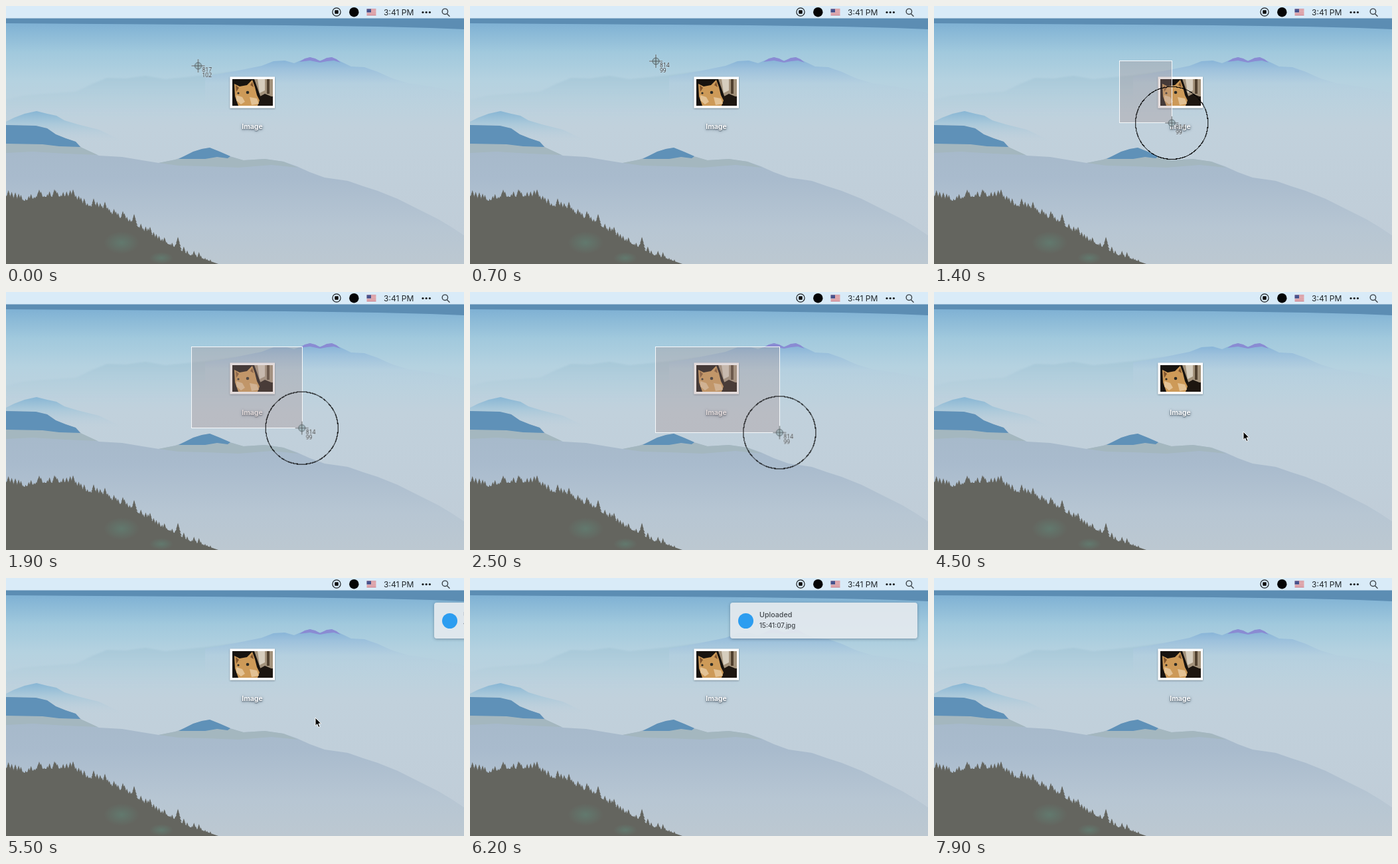
Write an HTML page that moves like this. It is 690 by 388 pixels and loops after 8 s.

```html
<!DOCTYPE html>
<html lang="en">
<head>
<meta charset="utf-8">
<title>Screen capture upload</title>
<style>
@property --x { syntax: '<number>'; inherits: true; initial-value: 289.5; }
@property --y { syntax: '<number>'; inherits: true; initial-value: 90; }
@property --readX { syntax: '<integer>'; inherits: true; initial-value: 817; }
@property --readY { syntax: '<integer>'; inherits: true; initial-value: 102; }

html, body { margin: 0; width: 100%; height: 100%; overflow: hidden; }
body { font-family: Inter, Roboto, sans-serif; }
#stage {
  position: relative; width: 690px; height: 388px; overflow: hidden;
  animation: drag 8s infinite;
}
#stage > * { position: absolute; }
#scene { left: 0; top: 0; }

/* Selection and pointer */
#selection {
  left: 279px; top: 82px; box-sizing: border-box;
  width: calc((var(--x) - 278) * 1px); height: calc((var(--y) - 82 + .5) * 1px);
  background: rgba(168, 142, 144, .32); border: 1.5px solid #f6f8fa;
  animation: selecting 8s step-end infinite;
}
#pointer {
  left: 0; top: 0; width: 0; height: 0;
  transform: translate(calc(var(--x) * 1px), calc(var(--y) * 1px));
  animation: aiming 8s step-end infinite;
}
#pointer svg { position: absolute; left: -60px; top: -60px; }
#ring { animation: pressing 8s step-end infinite; }
.reading {
  position: absolute; left: 6px; font: 8.5px/8px 'Open Sans', sans-serif; color: #23282c;
  text-shadow: 0 0 1px #fff, 0 0 2px rgba(255, 255, 255, .7);
}
.rx { top: 2px; counter-reset: n var(--readX); }
.ry { top: 10px; counter-reset: n var(--readY); }
.reading::after { content: counter(n); }
#arrow { left: 463px; top: 208px; animation: idle 8s step-end infinite; }

/* Notification */
#note {
  left: 392px; top: 37px; width: 282px; height: 54px; border-radius: 4px;
  background: rgba(226, 232, 238, .95); box-shadow: 0 1px 4px rgba(40, 60, 80, .42);
  color: #42474c; white-space: nowrap; animation: slide 8s infinite;
}
#note > * { position: absolute; }
#note i { left: 11.5px; top: 15.5px; width: 23px; height: 23px; border-radius: 50%; background: #2c9df0; }
#note b { left: 44px; top: 12px; font: 500 10.7px/14px Inter, sans-serif; }
#note span { left: 44px; top: 28px; font: 500 9.8px/13px Inter, sans-serif; }

@keyframes drag {
  0% { --x: 289.5; --y: 90; --readX: 817; --readY: 102; animation-timing-function: ease-in-out; }
  7.5%, 11% { --x: 280; --y: 83; --readX: 814; --readY: 99; animation-timing-function: ease-in; }
  17.5% { --x: 358; --y: 175.8; animation-timing-function: ease-out; }
  27.5%, 100% { --x: 466.4; --y: 211.4; --readX: 814; --readY: 99; }
}
@keyframes selecting { 0% { opacity: 0; } 11% { opacity: 1; } 34%, 100% { opacity: 0; } }
@keyframes pressing { 0% { opacity: 0; } 10% { opacity: 1; } 34%, 100% { opacity: 0; } }
@keyframes aiming { 0% { opacity: 1; } 35%, 100% { opacity: 0; } }
@keyframes idle { 0% { opacity: 0; } 35% { opacity: 1; } 72.5%, 100% { opacity: 0; } }
@keyframes slide {
  0%, 67.5% { transform: translateX(303px); animation-timing-function: cubic-bezier(.33, 0, .3, 1); }
  73.75%, 90% { transform: none; animation-timing-function: ease-in; }
  96.25%, 100% { transform: translateX(303px); }
}
</style>
</head>
<body>
<div id="stage">
  <svg id="scene" width="690" height="388" viewBox="0 0 690 388">
    <defs>
      <linearGradient id="sky" x2="0" y2="388" gradientUnits="userSpaceOnUse">
        <stop offset=".07" stop-color="#80b2d4"/>
        <stop offset=".18" stop-color="#a1c9dd"/>
        <stop offset=".29" stop-color="#b5d2e0"/>
        <stop offset=".47" stop-color="#c1d1dc"/>
        <stop offset="1" stop-color="#c0ccd7"/>
      </linearGradient>
      <linearGradient id="far" x1="0" x2="0" y1="76" y2="150" gradientUnits="userSpaceOnUse">
        <stop offset="0" stop-color="#7fafd6"/>
        <stop offset=".25" stop-color="#9dc1dc"/>
        <stop offset=".55" stop-color="#b4cfdf" stop-opacity=".85"/>
        <stop offset="1" stop-color="#bdd0dd" stop-opacity="0"/>
      </linearGradient>
      <linearGradient id="haze" x1="0" x2="0" y1="105" y2="165" gradientUnits="userSpaceOnUse">
        <stop offset="0" stop-color="#a3c5d6"/>
        <stop offset="1" stop-color="#b5cfdc" stop-opacity="0"/>
      </linearGradient>
      <linearGradient id="peak" x1="0" x2="0" y1="157" y2="205" gradientUnits="userSpaceOnUse">
        <stop offset="0" stop-color="#86b5d4"/>
        <stop offset=".4" stop-color="#a9c8da"/>
        <stop offset="1" stop-color="#bfd0dc" stop-opacity="0"/>
      </linearGradient>
      <linearGradient id="near" x1="0" x2="0" y1="205" y2="388" gradientUnits="userSpaceOnUse">
        <stop offset="0" stop-color="#a6b9ca"/>
        <stop offset=".3" stop-color="#a9bbcd"/>
        <stop offset=".7" stop-color="#b7c6d3"/>
        <stop offset="1" stop-color="#bcc8d1"/>
      </linearGradient>
      <radialGradient id="moss">
        <stop offset="0" stop-color="#5f9180" stop-opacity=".45"/>
        <stop offset="1" stop-color="#5f9180" stop-opacity="0"/>
      </radialGradient>
      <filter id="soft"><feGaussianBlur stdDeviation="1"/></filter>
      <filter id="blur"><feGaussianBlur stdDeviation=".6"/></filter>
      <filter id="shade" x="-20%" y="-20%" width="140%" height="160%">
        <feDropShadow dx="0" dy="1" stdDeviation="1.3" flood-color="#30404c" flood-opacity=".55"/>
      </filter>
      <clipPath id="crop"><path d="M341 110h61v40h-61z"/></clipPath>
    </defs>

    <path fill="url(#sky)" d="M0 0h690v388H0z"/>
    <path fill="#5c8db3" d="M0 18H690V35L640 33 560 31 420 29 300 28 140 27 0 26z"/>

    <!-- Distant ridges -->
    <path fill="url(#haze)" opacity=".7" filter="url(#soft)" d="M0 141 25 135 60 132 105 129 130 117 152 108 180 109 210 105 240 110 300 104 345 98 400 110V190H0z"/>
    <path fill="url(#far)" d="M300 106 345 98 385 90 403 83 420 82 434 86 446 81 458 77 473 82 490 77 503 83 520 91 540 92 560 99 580 108 605 116 640 121 690 131V190H300z"/>
    <path fill="#8a8bd3" d="M442 84 450 79 458 77 466 79 473 83 483 78 491 77 498 80 504 85 494 82 484 83 473 85 458 82z"/>
    <path fill="url(#peak)" d="M0 174 12 168 28 162 46 158 62 162 76 165 88 172 108 178 140 186 170 200V230H0z"/>

    <!-- Near ridges -->
    <path fill="url(#near)" d="M0 179 45 180 62 184 75 193 90 199 105 204 114 213 140 225 175 227 205 232 230 236 255 231 268 226 282 219 295 215 307 213 322 219 338 226 357 232 390 230 418 234 438 241 458 250 480 258 515 263 538 271 560 278 590 290 612 301 632 311 652 321 672 333 690 345V388H0z"/>
    <path fill="#a4b7bf" filter="url(#blur)" d="M0 206 55 207 112 212 138 224 90 222 40 219 0 221z"/>
    <path fill="#a4b7bf" filter="url(#blur)" d="M230 236 270 228 340 227 358 232 390 230 418 234 440 243 400 239 350 243 300 241 260 240z"/>
    <path fill="#5f91b8" d="M0 179 45 180 62 184 75 193 90 199 105 204 112 212 80 211 55 208 0 207z"/>
    <path fill="#5f91b8" d="M260 230 268 226 282 219 295 215 307 213 322 219 338 226 334 229 318 227 300 230z"/>

    <path id="forest" fill="#64655f"/>
    <ellipse cx="174" cy="356" rx="27" ry="17" fill="url(#moss)"/>
    <ellipse cx="234" cy="379" rx="18" ry="9" fill="url(#moss)"/>

    <!-- Menu bar -->
    <path fill="#d9ebf8" d="M0 0h690v18.5H0z"/>
    <circle cx="498" cy="9" r="6.1" fill="none" stroke="#1c2023" stroke-width="1.2"/>
    <rect x="495.2" y="6.2" width="5.6" height="5.6" rx="1" fill="#111"/>
    <circle cx="524.3" cy="9.2" r="7.2" fill="#050505"/>
    <path fill="#f3eef0" d="M543.5 4.5h14v9.5h-14z"/>
    <path stroke="#c4525d" stroke-width="1" d="M543.5 5h14m-14 2.2h14m-14 2.2h14m-14 2.2h14m-14 2h14"/>
    <path fill="#46548f" d="M543.5 4.5h6.5v5.2h-6.5z"/>
    <text x="569" y="13.5" font-size="12.1" fill="#22282c">3:41 PM</text>
    <g fill="#14181b"><circle cx="628" cy="9.5" r="1.6"/><circle cx="633.2" cy="9.5" r="1.6"/><circle cx="638.4" cy="9.5" r="1.6"/></g>
    <path fill="none" stroke="#3d4449" stroke-width="1.4" d="M664.5 11.8 668.5 15.8M665.6 8.3a4.2 4.2 0 1 1-8.4 0a4.2 4.2 0 1 1 8.4 0"/>

    <!-- Desktop file -->
    <path fill="#fff" filter="url(#shade)" d="M337.5 106.5h67.5v47h-67.5z"/>
    <g clip-path="url(#crop)">
      <path fill="#17130f" d="M341 110h61v40h-61z"/>
      <g filter="url(#blur)">
        <path fill="#a3927b" d="M374 110h28v26l-18 2z"/>
        <path fill="#d6cdbd" d="M379 110h11v17l-8 4z"/>
        <path fill="#51412f" d="M393 110h4v22h-4z"/>
        <path fill="#1d1610" d="M379 138 390 132 402 137V150H376z"/>
        <path fill="#cd9a58" d="M344 117 352 121 363 119 371 111 375 122 378 134 382 142 379 150H350L345 136z"/>
        <path fill="#80542d" d="M346 119 351 123 347 129zM368 119 371 114 373 122z"/>
        <path fill="#e3c294" d="M347 134 356 137 360 144 354 148 347 142zM367 137 378 139 381 147 370 149z"/>
        <circle cx="350" cy="131" r="1.6" fill="#2c2b25"/>
        <circle cx="364" cy="130" r="2.3" fill="#2c2b25"/>
      </g>
    </g>
    <text x="371" y="184.5" text-anchor="middle" font-size="10.5" font-weight="700" fill="#fff"
      style="text-shadow:0 1px 2px rgba(40,55,70,.8),0 1px 4px rgba(40,55,70,.5)">Image</text>
  </svg>

  <div id="selection"></div>

  <div id="pointer">
    <svg width="120" height="120" viewBox="-60 -60 120 120" fill="none">
      <circle id="ring" r="54.5" stroke="#000" stroke-width="1.2" shape-rendering="crispEdges"/>
      <path stroke="#fff" stroke-opacity=".4" stroke-width="2.6" d="M-10 0H10M0-10V10"/>
      <circle r="5" fill="#8ba9ad" fill-opacity=".5" stroke="#59656a" stroke-width="1"/>
      <path stroke="#4b555a" stroke-width="1.1" d="M-10 0H10M0-10V10"/>
    </svg>
    <div class="reading rx"></div>
    <div class="reading ry"></div>
  </div>

  <svg id="arrow" width="16" height="20" viewBox="-3 -2 16 20">
    <path fill="#050505" stroke="#fff" stroke-width="1" d="M0 0V12.4L2.8 9.8 4.8 14.6 7 13.7 5 9H8.8z"/>
  </svg>

  <div id="note"><i></i><b>Uploaded</b><span>15:41:07.jpg</span></div>
</div>

<script>
// Treetops along a falling slope, from a seeded generator.
let seed = 41;
const random = () => (seed = seed * 16807 % 2147483647) / 2147483647;

const slope = [[0, 286], [28, 293], [50, 287], [100, 286], [118, 299], [140, 304], [168, 317],
  [192, 327], [215, 344], [255, 363], [275, 374], [300, 381], [320, 388]];

function ground(x) {
  const i = Math.max(1, slope.findIndex(p => p[0] >= x));
  const [x0, y0] = slope[i - 1], [x1, y1] = slope[i];
  return y0 + (y1 - y0) * (x - x0) / (x1 - x0);
}

function tree(x, height) {
  const top = ground(x) + 6 - height, width = height * .25 + 1.5;
  const left = [], right = [];
  for (let k = 1; k <= 5; k++) {
    const y = top + height * k / 5, w = width * k / 5;
    right.push(`${x + w} ${y}`, `${x + w * .6} ${y - .8}`);
    left.unshift(`${x - w * .6} ${y - .8}`, `${x - w} ${y}`);
  }
  return `M${x} ${top}L${right.join(' ')} ${left.join(' ')}z`;
}

let d = 'M0 388L' + slope.map(p => p.join(' ')).join(' ') + 'z';
for (let x = 0; x < 312; x += 2.5 + random() * 3) d += tree(x, 7 + random() * 9);
for (const [x, h] of [[50, 17], [73, 17], [101, 17], [132, 19], [149, 20], [176, 18], [193, 21], [217, 19], [259, 24]]) d += tree(x, h);
document.getElementById('forest').setAttribute('d', d);
</script>
</body>
</html>
```
